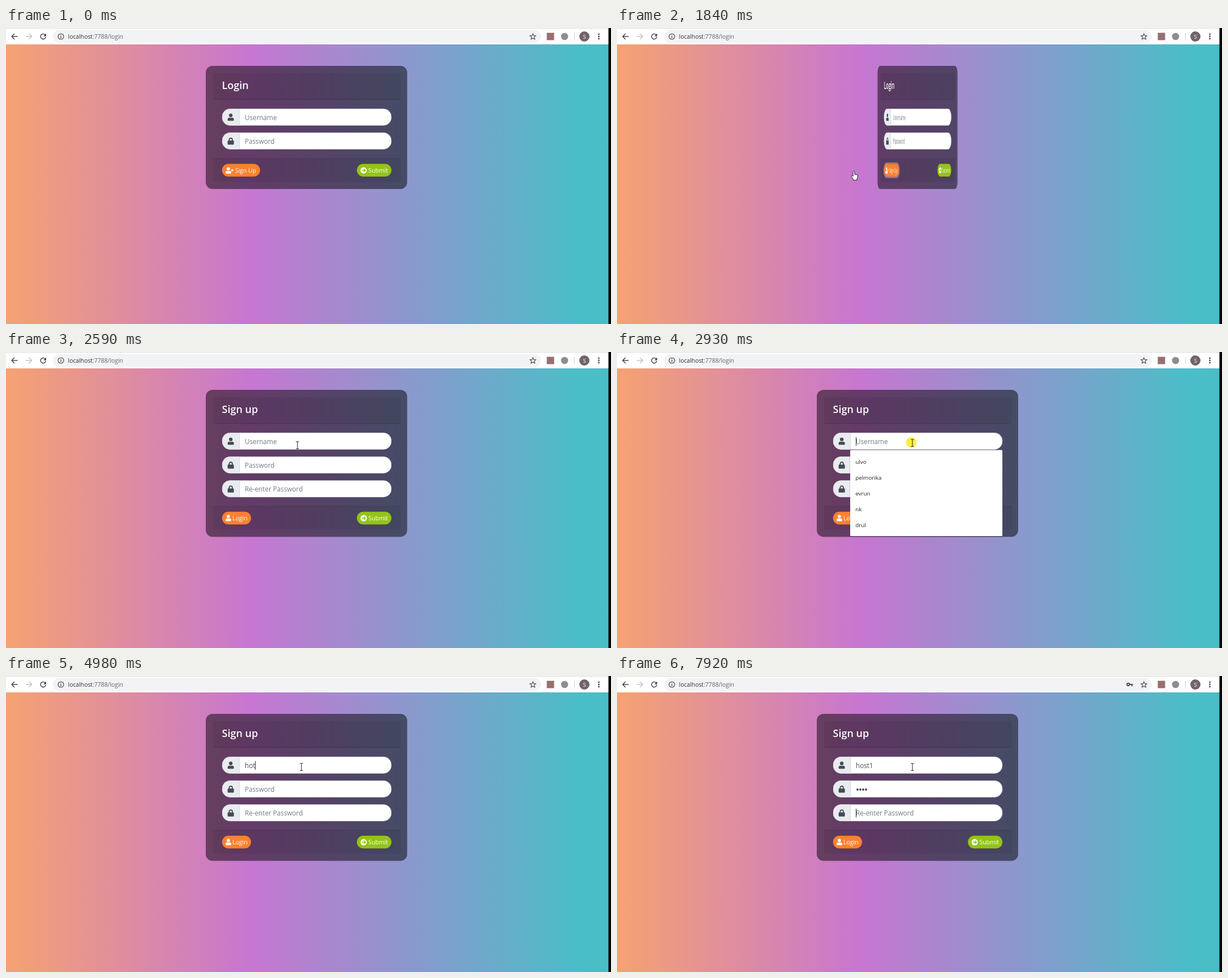
Animation of 1069x524 px, one loop 8 s. Source, as an HTML page:

```html
<!DOCTYPE html>
<html lang="en">
<head>
<meta charset="utf-8">
<title>Login and sign up</title>
<style>
  html, body { margin: 0; width: 100%; height: 100%; overflow: hidden; background: #fff; }
  svg { display: block; width: 100%; height: 100%; }
  text { font-family: "Open Sans", "Noto Sans", sans-serif; white-space: pre; }
  .line { fill: none; stroke: #51454f; stroke-width: 1.5; }
  .title { font-size: 18px; font-weight: 600; fill: #fff; }
  .button { font-size: 10.5px; fill: #fff; }
  .hint, .typed { font-size: 11.7px; }
  .hint { fill: #757b82; }
  .typed { fill: #495057; }
  .option { font-size: 9.8px; fill: #222; }
  .url { font-size: 10.4px; fill: #666; }
</style>
</head>
<body>
<svg viewBox="0 0 1069 524">
  <defs>
    <linearGradient id="sky">
      <stop offset="0" stop-color="#f4a274"/>
      <stop offset=".02" stop-color="#f3a076"/>
      <stop offset=".405" stop-color="#c776d1"/>
      <stop offset=".95" stop-color="#4abec8"/>
      <stop offset="1" stop-color="#49bec6"/>
    </linearGradient>
    <g id="person">
      <circle cx="7" cy="4" r="4"/>
      <path d="M4 9h.5a6 6 0 0 0 5 0h.5a4 4 0 0 1 4 4v1.5a1.5 1.5 0 0 1-1.5 1.5h-11A1.5 1.5 0 0 1 0 14.5V13a4 4 0 0 1 4-4z"/>
    </g>
    <g id="lock">
      <rect y="7" width="14" height="9" rx="1.5"/>
      <path d="M3.5 8V5a3.5 3.5 0 0 1 7 0v3" fill="none" stroke="#454a57" stroke-width="2.3"/>
    </g>
    <path id="plus" d="M16.7 4.5v6M13.7 7.5h6" stroke="#fff" stroke-width="2"/>
  </defs>

  <rect width="1069" height="524" fill="#fff"/>
  <rect width="1064" height="1" fill="#dcdde1"/>
  <rect y="29" width="1065" height="495" fill="url(#sky)"/>

  <g id="toolbar">
    <path class="line" d="M20.5 15H10.5M15 10l-5 5 5 5"/>
    <path class="line" d="M35 15h10.5M40.5 10l5 5-5 5" style="stroke:#c5c3c8"/>
    <path class="line" d="M69.3 12.2A4.6 4.6 0 1 0 70.2 16"/>
    <path d="M71 9.7v5h-5z" fill="#51454f"/>
    <rect x="83" y="4" width="862" height="22" rx="11" fill="#f1f3f4"/>
    <circle class="line" cx="97" cy="15" r="5" style="stroke-width:1.2"/>
    <path class="line" d="M97 14v4M97 11.6v1.4" style="stroke-width:1.3"/>
    <text class="url" x="109.5" y="18.7"><tspan fill="#333">localhost</tspan>:7788/login</text>
    <g id="key" class="line"><circle cx="903.3" cy="15" r="2.2" style="stroke-width:1.9"/><path d="M905.5 15h6M909.7 15v3" style="stroke-width:2"/></g>
    <path class="line" d="M931 10l1.5 3.4 3.7.3-2.8 2.5.9 3.6-3.3-1.9-3.3 1.9.9-3.6-2.8-2.5 3.7-.3z" style="stroke-width:1.1"/>
    <rect x="955.5" y="8.5" width="13" height="13" fill="#99706f"/>
    <circle cx="987" cy="15" r="6.3" fill="#8f8b91"/>
    <path d="M1004.5 9v12" stroke="#d3d3d6"/>
    <circle cx="1022" cy="15" r="9" fill="#72646b"/>
    <text x="1022" y="18.5" font-size="9.5" fill="#fff" text-anchor="middle">S</text>
    <g fill="#513f56"><circle cx="1047.5" cy="11" r="1.4"/><circle cx="1047.5" cy="15" r="1.4"/><circle cx="1047.5" cy="19" r="1.4"/></g>
  </g>

  <g id="login"></g>
  <g id="signup"></g>
  <g id="menu"></g>

  <circle id="click" r="9.3" fill="#fbef45"/>
  <g id="pointer">
    <path id="arrow" d="M0 0v14.2l3.3-3 2.2 5 2.2-1-2.2-4.8h4.6z" fill="#fff" stroke="#111" stroke-width=".9"/>
    <path id="hand" d="M-1.4 1a1.4 1.4 0 0 1 2.8 0v4.5l4 .8q1.6.4 1.5 2.2-.2 3-1.4 5v2.3h-6.4v-1.6l-3.2-4.3q-1-1.6.4-2.1 1-.3 2.3 1.4z" fill="#fff" stroke="#222"/>
    <path id="beam" d="M-2.8-6.3h1.6q1.2 0 1.2 1.2V5.1q0 1.2-1.2 1.2h-1.6M2.8-6.3H1.2Q0-6.3 0-5.1V5.1q0 1.2 1.2 1.2h1.6" fill="none" stroke="#333" stroke-width="1.1"/>
  </g>
  <rect x="1064.5" width="4.5" height="524" fill="#000"/>
</svg>

<script>
const LOOP = 8000, MIDDLE = 531, TEXT_X = 422;
const el = id => document.getElementById(id);
const show = (node, on) => node.setAttribute('visibility', on ? 'inherit' : 'hidden');

const icon = (name, x, y, scale, fill) =>
  `<use href="#${name}" transform="translate(${x} ${y}) scale(${scale})" fill="${fill}"/>`;

const field = (y, name, hint) => `
  <rect x="382" y="${y}" width="298.9" height="29.5" rx="14" fill="#fff"/>
  <path d="M412.5 ${y}h-16.5a14 14 0 0 0-14 14v1.5a14 14 0 0 0 14 14h16.5z" fill="#e9ecef"/>
  <path d="M412.5 ${y}v29.5" stroke="#ced4da" stroke-width=".8"/>
  <rect x="382.2" y="${y + .2}" width="298.5" height="29.1" rx="14" fill="none" stroke="#ced4da" stroke-width=".6"/>
  ${icon(name, 391.6, y + 8.6, .79, '#454a57')}
  <text class="hint" x="${TEXT_X}" y="${y + 20}">${hint}</text>`;

const pill = (x, y, width, fill, label, labelX) => `
  <rect x="${x}" y="${y}" width="${width}" height="22.6" rx="11.3" fill="${fill}"/>
  <text class="button" x="${labelX}" y="${y + 15.5}">${label}</text>`;

function card(title, fields, action) {
  const extra = (fields.length - 2) * 42.2;
  const foot = 231 + extra, y = foot + 9.5;
  return `
    <rect x="353" y="67" width="355.8" height="${218 + extra}" rx="12" fill="#000" fill-opacity=".5"/>
    <path d="M366 80h331v47H366zM366 ${foot}h331v41.5H366z" fill-opacity=".06"/>
    <path d="M366 126.5h331M366 ${foot}h331" stroke="#000" stroke-opacity=".14"/>
    <text class="title" x="381.5" y="108">${title}</text>
    ${fields.map(([name, hint], i) => field(143 + 42.2 * i, name, hint)).join('')}
    ${action(y)}
    ${pill(620, y, 61, '#93c417', 'Submit', 640.3)}
    <circle cx="632" cy="${y + 11.5}" r="5.6" fill="#fff"/>
    <path d="M628.8 ${y + 11.5}h6M632.2 ${y + 8.6}l2.9 2.9-2.9 2.9" fill="none" stroke="#93c417" stroke-width="1.5"/>`;
}

const orange = '#fc8131';
const userField = ['person', 'Username'], passField = ['lock', 'Password'];

el('login').innerHTML = card('Login', [userField, passField], y => `
  <rect id="focus" x="380.7" y="${y - 1.3}" width="69.8" height="25.2" rx="12.6" fill="none" stroke="#9c8fa8" stroke-opacity=".75" stroke-width="2.6"/>
  ${pill(381.7, y, 67.2, orange, 'Sign Up', 404.7)}
  ${icon('person', 388, y + 6, .7, '#fff')}${icon('plus', 388, y + 6, .7, '#fff')}`);

el('signup').innerHTML = card('Sign up', [userField, passField, ['lock', 'Re-enter Password']], y => `
  ${pill(381.7, y, 51.3, orange, 'Login', 400)}
  ${icon('person', 388, y + 5.6, .7, '#fff')}`) + `
  <text id="name" class="typed" x="${TEXT_X}" y="163"></text>
  <g id="dots" fill="#3f444a">${[0, 1, 2, 3].map(i => `<circle cx="${425 + 5 * i}" cy="201" r="1.9"/>`).join('')}</g>
  <rect id="caret" width="1" height="15.5" fill="#333"/>`;

el('menu').innerHTML = `
  <rect x="411.5" y="173.5" width="270" height="154" rx="2" fill="#000" fill-opacity=".22"/>
  <rect x="412" y="173.5" width="269" height="152.5" rx="1.5" fill="#fff"/>
  ${['ulvo', 'pelmorika', 'evrun', 'nk', 'drul'].map((word, i) =>
    `<text class="option" x="421.3" y="${197.7 + 28.1 * i}">${word}</text>`).join('')}`;

// Each track lists [start ms, values...]; a value holds until the next entry.
const turn = [[0, 1], [1730, .99], [1840, .397], [1960, .77], [2050, .97], [2190, 1]];
const typing = [[0, ''], [3470, 'h'], [3690, 'ho'], [3910, 'hot'], [4020, 'hots'], [4770, 'hot'],
  [5100, 'ho'], [5300, 'hos'], [5430, 'host'], [5730, 'host1']];
const secret = [[0, 0], [6930, 1], [7260, 2], [7490, 3], [7580, 4]];
const caretField = [[0, -1], [2930, 0], [4550, -1], [4980, 0], [6290, -1], [6400, 1], [7920, 2]];
const path = [[0, '', 0, 0], [410, 'arrow', 668, 382], [520, 'arrow', 642, 378], [740, 'arrow', 618, 366],
  [850, 'arrow', 566, 342], [960, 'arrow', 500, 317], [1070, 'arrow', 440, 292], [1170, 'arrow', 400, 272],
  [1280, 'hand', 390, 259], [1390, 'hand', 418.5, 253.5], [2050, 'beam', 421.5, 249], [2190, 'beam', 484, 195],
  [2350, 'beam', 495, 182], [2450, 'beam', 507, 172], [2540, 'beam', 515, 165], [2630, 'beam', 520, 162],
  [2720, 'beam', 522, 161]];
const at = (track, t) => track.findLast(entry => entry[0] <= t).slice(1);

const hints = [...el('signup').querySelectorAll('.hint')];
const dots = [...el('dots').children];

function draw(t) {
  const within = (from, to) => t >= from && t < to;
  const [scale] = at(turn, t), flipped = t >= 1960;
  for (const id of ['login', 'signup']) {
    el(id).setAttribute('transform', `translate(${MIDDLE} 0) scale(${scale} 1) translate(${-MIDDLE} 0)`);
    show(el(id), flipped === (id === 'signup'));
  }
  show(el('focus'), within(1620, 1960));
  show(el('menu'), within(2930, 3470));
  show(el('key'), t >= 7050);

  const [word] = at(typing, t), [count] = at(secret, t), [row] = at(caretField, t);
  el('name').textContent = word;
  show(hints[0], !word);
  show(hints[1], !count);
  dots.forEach((dot, i) => show(dot, i < count));

  const caret = el('caret');
  show(caret, row >= 0);
  const offset = [word ? el('name').getComputedTextLength() : 0, count ? 5 * count + .8 : 0, 0][row] || 0;
  caret.setAttribute('x', TEXT_X + Math.round(offset));
  caret.setAttribute('y', 150.5 + 42.2 * Math.max(row, 0));

  const [shape, x, y] = at(path, t);
  el('pointer').setAttribute('transform', `translate(${x} ${y})`);
  for (const id of ['arrow', 'hand', 'beam']) show(el(id), id === shape);
  const click = el('click');
  show(click, within(1620, 1730) || within(2930, 3040));
  click.setAttribute('cx', x - 2);
  click.setAttribute('cy', y - 1);
}

function tick() {
  draw(performance.now() % LOOP);
  requestAnimationFrame(tick);
}
tick();
</script>
</body>
</html>
```
